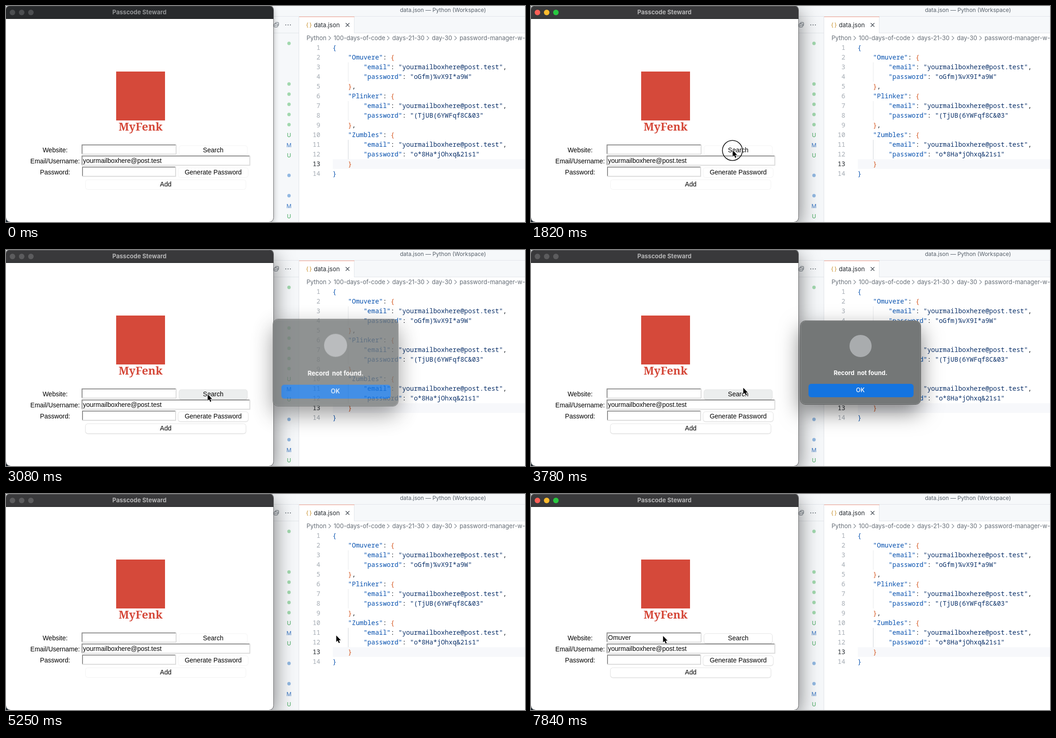
These frames come from a looping animation (1126x468 px, 8 s). An HTML page with a canvas:

```html
<!DOCTYPE html>
<html lang="en">
<head>
<meta charset="utf-8">
<style>
html, body { margin: 0; width: 100%; height: 100%; overflow: hidden; background: #f6f8fa; }
canvas { display: block; }
</style>
</head>
<body>
<canvas id="stage" width="1126" height="468"></canvas>
<script>
const stage = document.getElementById('stage').getContext('2d');
let ctx = stage;
const LOOP = 8000, STEP = 70;
const UI = '"Liberation Sans", Arial, sans-serif';
const SYS = 'Inter, sans-serif';
const MONO = '"Noto Sans Mono", monospace';
const EMAIL = 'yourmailboxhere@post.test';
const SITE = 'Omuver';
const KEY = '#0550ae', STR = '#0a3069', INK = '#24292f', BRACE = '#d4521a', RED = '#d5493a';

const records = [
  ['Omuvere', 'oGfm)%vX9I*a9W'],
  ['Plinker', '(TjUB(6YWFqf8C&03'],
  ['Zumbles', 'o*8Ha*jOhxq&21s1']
];

// Pointer path: time, x, y
const path = [
  [490, 370, 391], [840, 405, 331], [1050, 432, 299], [1190, 437, 311], [1680, 437, 312],
  [3500, 437, 312], [3780, 460, 298], [3920, 520, 298], [4130, 655, 306], [4340, 718, 310],
  [4620, 716, 306], [5250, 716, 306], [5390, 620, 312], [5600, 370, 314], [5740, 291, 310],
  [6370, 291, 310], [6650, 286, 307]
];
// Typed letters appear at these times
const keyTimes = [7070, 7350, 7490, 7700, 7840, 7840];
// Dialog growth: time, scale, opacity
const pop = [[2870, .45, .22], [2940, .7, .47], [3010, .94, .65], [3080, 1.04, .8], [3150, 1, 1]];

const between = (t, a, b) => t >= a && t < b;

function rect(x, y, w, h, fill) {
  ctx.fillStyle = fill;
  ctx.fillRect(x, y, w, h);
}

function round(x, y, w, h, r, fill, stroke) {
  ctx.beginPath();
  ctx.roundRect(x, y, w, h, r);
  if (fill) { ctx.fillStyle = fill; ctx.fill(); }
  if (stroke) { ctx.strokeStyle = stroke; ctx.lineWidth = 1; ctx.stroke(); }
}

function dot(x, y, r, fill) {
  ctx.beginPath();
  ctx.arc(x, y, r, 0, 7);
  ctx.fillStyle = fill;
  ctx.fill();
}

function line(color, width, ...points) {
  ctx.beginPath();
  points.forEach(([x, y]) => ctx.lineTo(x, y));
  ctx.strokeStyle = color;
  ctx.lineWidth = width;
  ctx.stroke();
}

function text(s, x, y, font, fill, align = 'left') {
  ctx.font = font;
  ctx.fillStyle = fill;
  ctx.textAlign = align;
  ctx.fillText(s, x, y);
}

function shadow(color, blur, y) {
  ctx.shadowColor = color;
  ctx.shadowBlur = blur;
  ctx.shadowOffsetY = y;
}

const noShadow = () => shadow('transparent', 0, 0);

// Each line is a list of [column, string, colour]
function codeLines() {
  const lines = [[[0, '{', KEY]]];
  const field = (name, value, comma) => [
    [8, `"${name}"`, KEY], [10 + name.length, ':', INK],
    [12 + name.length, `"${value}"`, STR], [14 + name.length + value.length, comma, INK]
  ];
  records.forEach(([name, pass], i) => lines.push(
    [[4, `"${name}"`, KEY], [6 + name.length, ':', INK], [8 + name.length, '{', BRACE]],
    field('email', EMAIL, ','),
    field('password', pass, ''),
    [[4, '}', BRACE], [5, i < 2 ? ',' : '', INK]]
  ));
  lines.push([[0, '}', KEY]]);
  return lines;
}
const code = codeLines();

function drawEditor() {
  rect(0, 0, 1126, 468, '#f6f8fa');
  rect(636, 58, 490, 410, '#fff');
  rect(580, 22, 546, 1, '#e1e5ea');
  rect(580, 58, 56, 1, '#e1e5ea');
  rect(756, 58, 370, 1, '#e1e5ea');
  rect(635, 23, 1, 445, '#dfe3e8');
  rect(636, 23, 120, 36, '#fff');
  rect(755, 23, 1, 36, '#e1e5ea');
  rect(636, 23, 120, 1, '#f9a08c');

  text('data.json — Python (Workspace)', 948, 13, '12px ' + SYS, '#57606a', 'center');
  text('{}', 650, 45, '12px ' + MONO, '#c9922e');
  text('data.json', 668, 46, '13px ' + SYS, INK);
  line('#424a53', 1.2, [737, 37], [745, 45]);
  line('#424a53', 1.2, [745, 37], [737, 45]);
  round(584.5, 35.5, 7, 7, 1, null, '#57606a');
  round(581.5, 38.5, 8, 7, 1, '#f6f8fa', '#57606a');
  line('#57606a', 1, [583, 42], [588, 42]);
  for (const x of [607, 612, 617]) dot(x, 41, 1.1, '#57606a');

  const crumbs = [['Python', 652], ['100-days-of-code', 711], ['days-21-30', 838],
    ['day-30', 924], ['password-manager-w-e', 984]];
  crumbs.forEach(([s, x], i) => {
    text(s, x, 74, '13px ' + SYS, '#656d76');
    if (i) line('#7d858e', 1.1, [x - 11, 65], [x - 6.5, 69.5], [x - 11, 74]);
  });

  for (const y of [81, 169, 191, 213, 235, 257]) dot(614, y, 3.7, '#a2d8ae');
  for (const y of [367, 411]) dot(614, y, 3.7, '#93b9e2');
  for (const y of [279, 323, 455]) text('U', 614, y + 5, '12px ' + SYS, '#3fa75a', 'center');
  for (const y of [301, 433]) text('M', 614, y + 5, '12px ' + SYS, '#3c78c3', 'center');

  rect(709, 332, 417, 21, '#f7f8fb');
  for (const y of [122, 206, 290]) rect(742, y, 1, 42, y === 290 ? '#d0d4d9' : '#e6e8eb');
  code.forEach((parts, i) => {
    const y = 95 + 21 * i;
    text(i + 1, 682, y, '14px ' + MONO, i === 12 ? INK : '#a4abb3', 'right');
    for (const [col, s, color] of parts) text(s, 708.5 + col * 8.4, y, '14px ' + MONO, color);
  });
}

function drawEntry(x, y, w, value = '') {
  rect(x, y, w, 22, '#dcdcdc');
  rect(x, y, w - 2, 20, '#909090');
  rect(x + 2, y + 2, w - 4, 18, '#fff');
  text(value, 167, y + 16, '14px ' + UI, '#000');
}

function drawButton(x, y, w, h, label, active, pressed) {
  if (active) {
    shadow('rgba(0,0,0,.25)', 1.5, .7);
    round(x + .5, y + .5, w - 1, h - 1, 5, pressed ? '#eceeee' : '#fff');
    noShadow();
  }
  round(x + .5, y + .5, w - 1, h - 1, 5, null, active ? '#e6e6e6' : '#f3f3f3');
  text(label, x + w / 2, Math.floor(y + h / 2 + 4.5), '14px ' + UI, '#000', 'center');
}

function drawApp(t) {
  const front = t >= 1820;
  const lit = between(t, 1820, 2520) || t >= 5810;
  const active = between(t, 1890, 5250) || t >= 5810;

  rect(0, 440, 30, 28, '#20303c');
  shadow(`rgba(0,0,0,${front ? .55 : .3})`, front ? 46 : 14, front ? 14 : 4);
  round(0, 0, 580, 468, [8, 8, 10, 10], '#fff');
  noShadow();
  round(-.5, -.5, 581, 469, [8, 8, 10, 10], null, '#6a6b6d');
  round(0, 0, 580, 28, [8, 8, 0, 0], front ? '#39393b' : '#282a2c');
  rect(0, 27, 580, 1, '#161718');
  rect(8, 0, 564, 1, front ? '#626264' : '#3c3e40');
  ['#fe5f57', '#febc2e', '#28c840'].forEach((c, i) =>
    dot(14 + 20 * i, 14, 6, lit ? c : front ? '#5c5c5e' : '#4d4f51'));
  text('Passcode Steward', 289.5, 18, 'bold 13px ' + SYS, front ? '#b5b5b6' : '#929496', 'center');

  rect(239, 142, 106, 106, RED);
  text('MyFenk', 292, 270, 'bold 24px "Noto Serif", serif', RED, 'center');

  ['Website:', 'Email/Username:', 'Password:'].forEach((s, i) =>
    text(s, 106.5, 317 + 24 * i, '14px ' + UI, '#000', 'center'));
  drawEntry(164, 300, 206, SITE.slice(0, keyTimes.filter(k => t >= k).length));
  drawEntry(164, 324, 366, EMAIL);
  drawEntry(165, 348, 204);
  drawButton(375, 302, 149, 22, 'Search', active, t < 5250);
  drawButton(373, 350, 153, 22, 'Generate Password', active);
  drawButton(172, 376, 349, 22, 'Add', active);
}

// The dialog is painted once so that it can fade as a whole
function paintDialog() {
  const layer = document.createElement('canvas');
  layer.width = 1126;
  layer.height = 468;
  ctx = layer.getContext('2d');
  shadow('rgba(0,0,0,.5)', 46, 17);
  round(585, 154, 260, 180, 10, '#747777');
  noShadow();
  round(584.5, 153.5, 261, 181, 10.5, null, '#4c4e4e');
  round(585.5, 154.5, 259, 179, 9.5, null, '#8f9292');
  dot(715, 208, 24, '#a9acae');
  text('Record  not found.', 715, 271, 'bold 13px ' + SYS, '#fff', 'center');
  round(602, 290, 228, 29, 6, '#1474e0');
  text('OK', 714.5, 308, '500 13px ' + SYS, '#fff', 'center');
  ctx = stage;
  return layer;
}
const dialog = paintDialog();

function drawDialog(t) {
  if (!between(t, 2870, 5250)) return;
  const [, scale, alpha] = pop.findLast(p => t >= p[0]);
  ctx.save();
  ctx.translate(715, 244);
  ctx.scale(scale, scale);
  ctx.globalAlpha = alpha;
  ctx.drawImage(dialog, -715, -244);
  ctx.restore();
}

function pointerAt(t) {
  const i = path.findLastIndex(p => t >= p[0]);
  const [t0, x0, y0] = path[i], [t1, x1, y1] = path[i + 1] || [LOOP, x0, y0];
  const k = (t - t0) / (t1 - t0);
  return [x0 + (x1 - x0) * k, y0 + (y1 - y0) * k];
}

function drawPointer(t) {
  if (t < path[0][0]) return;
  const [x, y] = pointerAt(t);
  ctx.save();
  ctx.translate(x, y);
  if (between(t, 1820, 2030) || between(t, 4900, 5250) || between(t, 5810, 6020)) {
    ctx.beginPath();
    ctx.arc(0, 1, 21.7, 0, 7);
    ctx.strokeStyle = '#111';
    ctx.lineWidth = 1.6;
    ctx.stroke();
  }
  const arrow = new Path2D('M.5 .5V14.5L3.7 11.6L6 17L8.4 16L6.1 10.8H10.3Z');
  ctx.lineJoin = 'round';
  ctx.strokeStyle = '#fff';
  ctx.lineWidth = 1.8;
  ctx.stroke(arrow);
  ctx.fillStyle = '#000';
  ctx.fill(arrow);
  ctx.restore();
}

function frame(now) {
  const t = Math.floor(now % LOOP / STEP) * STEP;
  drawEditor();
  drawApp(t);
  drawDialog(t);
  drawPointer(t);
  requestAnimationFrame(frame);
}
frame(performance.now());
</script>
</body>
</html>
```
